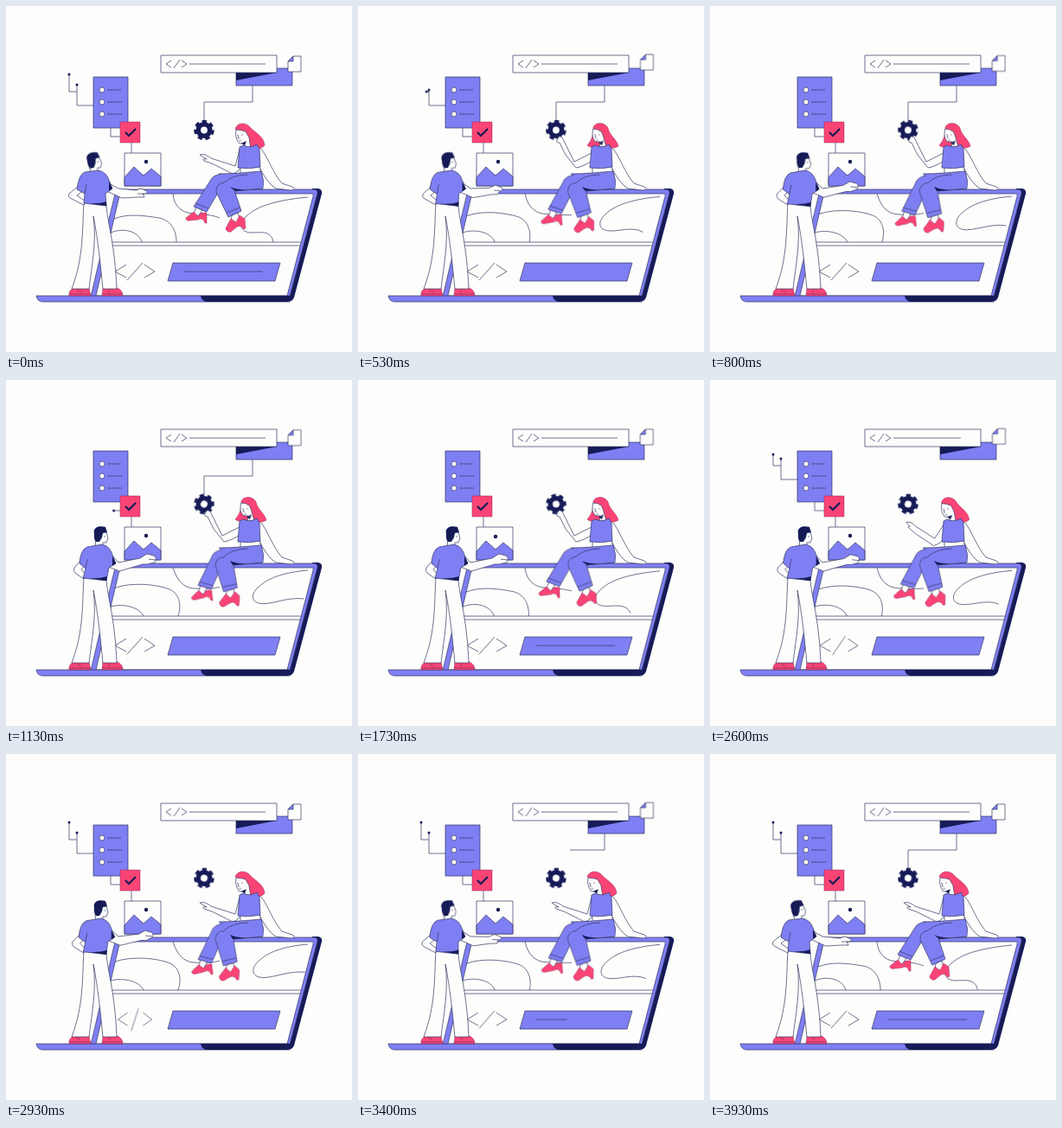
These frames come from a looping animation (400x400 px, 3990 ms). An HTML page:

```html
<!DOCTYPE html>
<html lang="en">
<head>
<meta charset="utf-8">
<title>Building a website</title>
<style>
  html, body { margin: 0; width: 100%; height: 100%; overflow: hidden; background: #fdfdfc; }
  svg {
    display: block; width: 100%; height: 100%;
    --paper: #fdfdfc; --violet: #7f7ff4; --navy: #161b57; --red: #fb4476; --ink: #33365f;
    fill: none; stroke: var(--ink); stroke-width: .7; stroke-linejoin: round;
  }
  .paper { fill: var(--paper); }
  .violet { fill: var(--violet); }
  .navy { fill: var(--navy); stroke: none; }
  .red { fill: var(--red); stroke: #8f2b62; stroke-width: .5; }
  .bold { stroke: var(--navy); }
  .trim { stroke-dasharray: 1 2; }

  /* Two-pose shapes: --a is the resting pose, --b the other one */
  .man { d: var(--a); animation: man 3990ms infinite ease-in-out; }
  .woman { d: var(--a); animation: woman 3990ms infinite ease-in-out; }
  .wave { d: var(--a); animation: wave 997.5ms infinite alternate cubic-bezier(.37, 0, .63, 1); }
  @keyframes man {
    0%, 2% { d: var(--a); }
    28%, 57% { d: var(--b); }
    100% { d: var(--a); }
  }
  @keyframes woman {
    0%, 2% { d: var(--a); }
    12.5%, 57% { d: var(--b); }
    71%, 100% { d: var(--a); }
  }
  @keyframes wave { to { d: var(--b); } }

  .man-head { transform-origin: 108px 190px; animation: man-head 3990ms infinite ease-in-out; }
  @keyframes man-head {
    0%, 2% { transform: translate(-6px, 0) rotate(-10deg); }
    28%, 73% { transform: none; }
    94%, 100% { transform: translate(-6px, 0) rotate(-10deg); }
  }
  .woman-face { animation: woman-face 3990ms infinite ease-in-out; }
  @keyframes woman-face {
    0%, 2% { transform: none; }
    12.5%, 57% { transform: translate(6px, -.5px); }
    71%, 100% { transform: none; }
  }

  .leg { animation: leg 997.5ms infinite alternate cubic-bezier(.37, 0, .63, 1); }
  .far { transform-origin: 245px 200px; --to: translate(1px, 2.5px) rotate(-7deg); }
  .near { transform-origin: 252px 208px; --to: translate(0, .5px) rotate(9deg); }
  @keyframes leg { to { transform: var(--to); } }

  .gear { transform-origin: 229px 143.5px; animation: gear 3990ms infinite ease-in-out; }
  @keyframes gear {
    0%, 8% { transform: none; }
    58%, 100% { transform: rotate(102.86deg); }
  }
  .cable { animation: cable 3990ms infinite ease-in-out; }
  @keyframes cable {
    0%, 29% { stroke-dashoffset: 0; }
    42%, 75% { stroke-dashoffset: 1.01; }
    93%, 100% { stroke-dashoffset: 0; }
  }

  .stem { animation: stem 3990ms infinite linear; }
  @keyframes stem {
    0%, 11% { stroke-dashoffset: 0; }
    13.3% { stroke-dashoffset: .055; }
    28.3% { stroke-dashoffset: .93; }
    30%, 44% { stroke-dashoffset: 1.01; }
    55.1% { stroke-dashoffset: .22; }
    61%, 100% { stroke-dashoffset: 0; }
  }
  .twig { animation: twig 3990ms infinite linear; }
  @keyframes twig {
    0%, 7% { stroke-dashoffset: 0; }
    13.3% { stroke-dashoffset: .9; }
    14%, 59.5% { stroke-dashoffset: 1.01; }
    67%, 100% { stroke-dashoffset: 0; }
  }
  .stem-tip, .twig-tip { offset-rotate: 0deg; }
  .stem-tip { offset-path: path("M132 151H121V115H82V91"); animation: stem-tip 3990ms infinite linear; }
  .twig-tip { offset-path: path("M82 99H73V79"); animation: twig-tip 3990ms infinite linear; }
  @keyframes stem-tip {
    0%, 11% { offset-distance: 100%; opacity: 1; }
    13.3% { offset-distance: 94.5%; }
    28.3% { offset-distance: 7%; opacity: 1; }
    30%, 44% { offset-distance: 0%; opacity: 0; }
    45% { opacity: 1; }
    55.1% { offset-distance: 78%; }
    61%, 100% { offset-distance: 100%; opacity: 1; }
  }
  @keyframes twig-tip {
    0%, 7% { offset-distance: 100%; opacity: 1; }
    13.3% { offset-distance: 10%; opacity: 1; }
    14%, 59.5% { offset-distance: 0%; opacity: 0; }
    60% { opacity: 1; }
    67%, 100% { offset-distance: 100%; opacity: 1; }
  }

  .title-line { animation: title-line 3990ms infinite ease-in-out; }
  @keyframes title-line {
    0%, 43.5% { stroke-dashoffset: 0; }
    53%, 56% { stroke-dashoffset: 1.01; }
    68%, 100% { stroke-dashoffset: 0; }
  }
  .screen-line { animation: screen-line 1995ms infinite linear; }
  @keyframes screen-line {
    0%, 5% { stroke-dashoffset: 0; }
    10.3% { stroke-dashoffset: .13; }
    25%, 60% { stroke-dashoffset: 1.01; }
    86%, 100% { stroke-dashoffset: 0; }
  }
  .title-code { transform-origin: 197px 67px; animation: title-code 3990ms infinite ease-in-out; }
  @keyframes title-code {
    0%, 44% { transform: none; }
    55% { transform: scale(.78, 1.1); }
    66%, 100% { transform: none; }
  }
  .screen-code { transform-origin: 149px 307px; animation: screen-code 3990ms infinite ease-in-out; }
  .slash { transform-origin: 149px 307px; animation: slash 3990ms infinite ease-in-out; }
  @keyframes screen-code {
    0%, 60% { transform: none; }
    73.4% { transform: scaleX(.85); }
    87%, 100% { transform: none; }
  }
  @keyframes slash {
    0%, 60% { transform: none; }
    73.4% { transform: scale(.55, 1.3); }
    87%, 100% { transform: none; }
  }

  .page { animation: page 997.5ms infinite ease-in-out; }
  @keyframes page { 50% { transform: translate(.5px, -2px); } }
  .sun { animation: sun 3990ms infinite ease-in-out; }
  @keyframes sun {
    0%, 33% { transform: none; }
    43.4% { transform: translate(-3px, 1px); }
    54%, 100% { transform: none; }
  }
</style>
</head>
<body>
<svg viewBox="0 0 400 400">
  <!-- connectors -->
  <path class="trim stem" pathLength="1" d="M132 151H121V115H82V91"/>
  <path class="trim twig" pathLength="1" d="M82 99H73V79"/>
  <circle class="navy stem-tip" r="1.5"/>
  <circle class="navy twig-tip" r="1.5"/>
  <path d="M145 157V170"/>
  <path class="trim cable" pathLength="1" d="M285 92V111H229V132"/>

  <!-- list, check box and picture -->
  <path class="violet" d="M101 82H141V141H101Z"/>
  <path d="M117 97H133M117 111H134M117 125H134"/>
  <g class="paper">
    <circle cx="111" cy="97" r="3"/><circle cx="111" cy="111" r="3"/><circle cx="111" cy="125" r="3"/>
  </g>
  <path class="red" d="M132 134H155V158H132Z"/>
  <path class="bold" d="M138 146L142 150L150 142" stroke-width="2.2"/>
  <path class="paper" d="M137 170H179V208H137Z"/>
  <path class="violet" d="M137 198L148 186L159 196L168 188L179 197V208H137Z"/>
  <circle class="navy sun" cx="162" cy="180" r="2.2"/>

  <!-- title bar -->
  <path class="violet" d="M266 72H331V92H266Z"/>
  <path class="navy" d="M266 77H313L266 86Z"/>
  <path class="paper" d="M179 57H313V77H179Z"/>
  <path class="title-code" d="M191 63L185 67L191 71M201 62L194 72M203 63L209 67L203 71"/>
  <path class="trim title-line" pathLength="1" d="M212 67H300"/>
  <g class="page">
    <path class="paper" d="M332 58H341V76H326V64Z"/>
    <path class="violet" d="M332 58V64H326Z"/>
  </g>

  <!-- laptop -->
  <path class="navy" d="M354 211H361Q366 212 365 217L333 337Q331 342 325 342H318Z"/>
  <path class="violet" d="M131 212H355Q361 212 360 217L328 336H98L126 217Q127 212 131 212Z"/>
  <path class="paper" d="M133 217H354Q356 217 355 220L325 335H104L131 220Z"/>
  <path d="M119 273H341M118 277H340"/>
  <path class="wave" style="--a:path('M125 246C142 239 163 243 177 245C192 248 197 261 197 273');--b:path('M126 240C146 233 176 236 190 242C202 248 203 262 199 273')"/>
  <path class="wave" style="--a:path('M121 262C136 256 153 260 157 273');--b:path('M121 262C136 258 155 263 159 273')"/>
  <path class="wave" style="--a:path('M193 217C194 232 204 240 218 240C232 241 240 242 247 245');--b:path('M193 217C198 232 205 240 217 241C231 242 240 241 247 239')"/>
  <path class="wave" style="--a:path('M349 221C317 224 292 230 279 242C268 252 270 261 283 262C294 262 307 259 309 273');--b:path('M349 220C322 222 304 229 295 237C285 244 282 255 293 258C305 261 325 250 346 252')"/>
  <path class="violet" d="M193 297H317L311 318H187Z"/>
  <path class="trim screen-line" pathLength="1" d="M205 307H297"/>
  <g class="screen-code">
    <path d="M139 299L126 307L139 314M160 299L172 307L160 314"/>
    <path class="slash" d="M158 297L140 317"/>
  </g>
  <path class="violet" d="M35 335H328V342H43Q36 342 35 335Z"/>
  <path class="navy" d="M225 335H331L330 339Q328 342 323 342H232Q226 341 225 335Z"/>

  <!-- man -->
  <path class="red" d="M73 335Q72 329 78 326H96L98 335Z"/>
  <path class="red" d="M111 335L112 326H129Q135 329 135 335Z"/>
  <path d="M73 333H98M111 333H135M82 328L87 331M121 328L118 331" stroke-width=".5"/>
  <path class="paper" d="M90 227L116 230C117 250 126 275 128 327H112C109 296 106 268 101 243C105 274 99 300 96 327H76C90 290 88 260 90 227Z"/>
  <path class="paper man" style="--a:path('M84 208L73 217Q71 221 76 223L90 230L92 226L82 219L91 212Z');--b:path('M87 208L79 217Q77 221 81 224L90 230L93 226L87 219L93 212Z')"/>
  <path class="paper man" style="--a:path('M119 205L130 211L150 213L156 211L163 214Q165 217 158 217L160 221L152 221L134 222L114 213Z');--b:path('M123 203L130 211L155 206L163 201L171 203Q175 206 172 211L163 213L158 213L131 221L116 215Z')"/>
  <path class="man" style="--a:path('M152 217L159 217');--b:path('M165 207L173 208')"/>
  <g class="man-head">
    <path class="paper" d="M110 176H116L118 183L116 188L112 188V194H104L103 185Z"/>
    <path class="navy" d="M102 178C100 170 108 168 115 170L117 176L112 177L111 182L108 187L104 187Q101 183 102 178Z"/>
    <path d="M111 180Q108 181 110 184M114 180V182" stroke-width=".6"/>
  </g>
  <path class="violet man" style="--a:path('M91 192L107 190Q116 192 119 201L123 211L115 217L116 231L90 228L91 217L82 212Q84 195 91 192Z');--b:path('M94 193L111 190Q120 192 123 202L127 212L119 217L116 232L89 229L92 218L85 212Q86 196 94 193Z')"/>
  <path class="navy man" style="--a:path('M119 203L123 211L119 214Z');--b:path('M123 204L127 212L123 215Z')"/>
  <path class="navy man" style="--a:path('M95 228Q108 229 116 226L116 231Z');--b:path('M95 229Q108 230 117 227L116 232Z')"/>
  <path class="man" style="--a:path('M91 217L93 206');--b:path('M92 218L94 207')"/>

  <!-- gear -->
  <g class="gear bold">
    <circle cx="229" cy="143.5" r="6.7" stroke-width="5.6"/>
    <circle cx="229" cy="143.5" r="9.8" pathLength="14" stroke-dasharray="1.15 .85" stroke-width="4"/>
  </g>

  <!-- woman -->
  <path class="paper" d="M291 162C301 168 306 190 319 205L331 209Q336 212 330 213L312 211C304 206 297 195 292 184Z"/>
  <path class="paper woman" style="--a:path('M270 166L265 185L237 176Q230 170 224 172L232 177Q226 176 229 179L238 182L262 194Q270 192 274 182Z');--b:path('M270 170L250 180L238 156Q236 150 232 151L230 155Q229 158 233 158L240 172L252 187Q260 186 272 178Z')"/>
  <path class="paper" d="M271 184H293L295 194H271Z"/>
  <path class="red woman" style="--a:path('M265 142C267 135 276 134 281 139C288 147 298 150 299 161C294 167 285 165 277 160C276 154 274 148 272 144Q268 145 265 142Z');--b:path('M272 140C275 134 285 134 289 141C291 150 299 154 301 162C295 166 287 164 284 160C278 161 270 166 265 161Q273 152 272 140Z')"/>
  <path class="paper woman" style="--a:path('M266 143C265 149 266 155 270 159L276 158L276 163L283 165L281 152L277 145Q271 143 266 143Z');--b:path('M272 142C270 149 271 154 275 157L280 157L279 163L287 163L284 152L282 146Q278 142 272 142Z')"/>
  <g class="woman-face">
    <path d="M267 149L269 150M272 149L274 149M269 150L268 153H270M269 156Q271 156 272 155" stroke-width=".6"/>
    <path class="navy" d="M272 159L278 156L276 161Z"/>
  </g>
  <path class="violet" d="M270 163L274 161Q282 165 290 160L293 165L294 186Q282 189 268 187Z"/>
  <path class="violet" d="M246 194Q258 194 271 193L295 191Q299 202 297 211L262 214"/>
  <g class="leg far">
    <path class="paper" d="M220 232L217 240L222 243L227 236Z"/>
    <path class="red" d="M217 238L208 245Q208 249 213 248L222 247Q228 244 230 251H232V239H226L222 243Z"/>
    <path class="violet" d="M258 205Q250 206 245 216L232 238L217 232L238 199Q241 195 250 194"/>
    <path d="M219 228L234 234"/>
  </g>
  <path class="violet" stroke="none" d="M250 207Q262 194 280 195L296 196L297 211L262 214Z"/>
  <path d="M252 204Q262 195 280 195M297 211L262 214"/>
  <path class="navy" d="M259 209Q268 213 280 212L262 214Z"/>
  <g class="leg near">
    <path class="paper" d="M261 242L260 249L265 253L270 246L268 239Z"/>
    <path class="red" d="M260 246L254 257Q255 262 260 261L266 256Q271 252 275 258L277 257L276 246L270 242L266 250Z"/>
    <path class="violet" d="M264 213L272 237L257 244L243 215Q242 206 252 204"/>
    <path d="M255 239L270 233"/>
  </g>
</svg>
</body>
</html>
```
